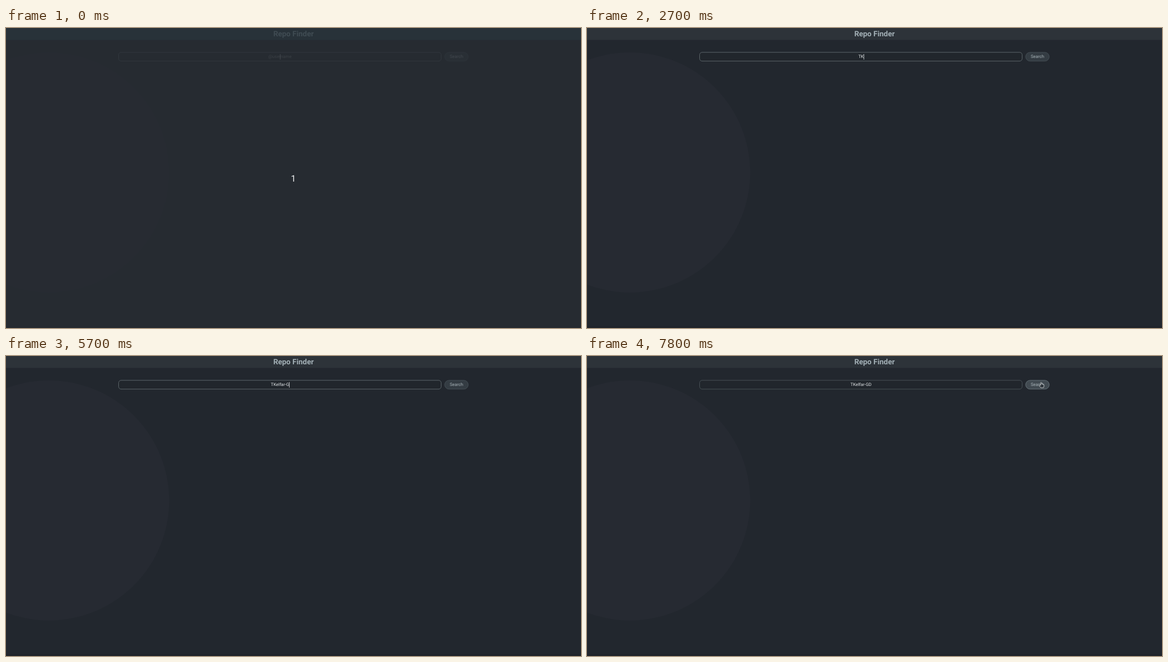
An HTML page for the animation above (8000 ms loop, 1034 by 541 pixels).

```html
<!DOCTYPE html>
<html lang="en">
<head>
<meta charset="utf-8">
<title>Repo Finder</title>
<style>
  html, body { margin: 0; width: 100%; height: 100%; overflow: hidden; background: #22272e; }
  svg { display: block; width: 1034px; height: 541px; }
  text { font: 7.85px Roboto, sans-serif; text-anchor: middle; text-rendering: geometricPrecision; }
  #title { font-size: 13.46px; font-weight: 700; fill: #a3b0b6; }
  #count { font-size: 16.2px; fill: #eceeef; }
  #label { fill: #a9b4b9; }
</style>
</head>
<body>
<svg viewBox="0 0 1034 541">
  <rect width="1034" height="541" fill="#22272e"/>
  <circle cx="77" cy="260.5" r="216.5" fill="#262a32"/>
  <rect y="537.5" width="1034" height="3.5" fill="#20242a"/>
  <rect width="1034" height="21.5" fill="#2d3339"/>
  <text id="title" x="517" y="15.3">Repo Finder</text>

  <rect id="box" x="202.5" y="43.9" width="580" height="15.8" rx="4.5" fill="#21262c"/>
  <text id="field" x="492.7" y="54.4"></text>
  <rect id="caret" y="47" width=".8" height="10" fill="#dfe3e5"/>

  <rect id="button" x="788.8" y="43.9" width="42.4" height="15.8" rx="7.9"/>
  <text id="label" x="810" y="54.4">Search</text>

  <path id="arrow" d="M0 0V9L2.1 7.2L3.6 10.2L5.2 9.4L3.8 6.5H6.6Z"
        fill="#22272e" stroke="#e6e8e9" stroke-width=".8" stroke-linejoin="round"/>
  <path id="hand" d="M-.9 5.6V1Q0 -.8 .9 1V3.6Q1.9 3 2.5 3.9Q3.4 3.4 4 4.3Q5 4 5.2 5V7.6L4.4 10H-.4L-3.1 6.9Q-3.2 5.3 -1.8 5.5Z"
        fill="#30373d" stroke="#e6e8e9" stroke-width=".75" stroke-linejoin="round"/>

  <g id="cover">
    <rect y="21.5" width="1034" height="519.5" fill="#272c33" opacity=".8"/>
    <rect width="1034" height="21.5" fill="#27323a" opacity=".8"/>
    <text id="count" x="516.8" y="276.5">1</text>
  </g>
</svg>
<script>
const LOOP = 8000;
const NAME = 'TKelfar-GD';
const HINT = '@username';

// time, letters typed, caret visible
const typing = [
  [0, 0, 1], [400, 0, 0], [1500, 1, 1], [1600, 1, 0],
  [2700, 2, 1], [2800, 2, 0], [3200, 3, 1], [3400, 4, 1],
  [3800, 5, 1], [4000, 6, 1], [4100, 7, 1], [4200, 7, 0],
  [4900, 8, 1], [5200, 8, 0], [5700, 9, 1], [6000, 10, 1], [6400, 10, 0]
];

// time, pointer tip x, y, over the button
const pointer = [
  [6900, 818.3, 66, 0], [7000, 818.3, 62, 0], [7100, 818, 53, 1], [7200, 817.5, 43, 1],
  [7400, 817.3, 44, 1], [7500, 817.1, 45, 1], [7600, 816.9, 46, 1],
  [7700, 816.7, 46.6, 1], [7800, 816.5, 47.2, 1]
];

const el = id => document.getElementById(id);
const [box, field, caret, button, arrow, hand, cover] =
  ['box', 'field', 'caret', 'button', 'arrow', 'hand', 'cover'].map(el);

const stepAt = (table, t) => table.filter(row => row[0] <= t).pop();
const show = (node, on) => node.setAttribute('visibility', on ? 'visible' : 'hidden');
const paint = (node, fill, stroke) => {
  node.setAttribute('fill', fill);
  node.setAttribute('stroke', stroke);
};

function drawField(t) {
  const [, count, blink] = stepAt(typing, t);
  const text = count ? NAME.slice(0, count) : HINT;
  if (field.textContent !== text) field.textContent = text;
  field.setAttribute('fill', count ? '#e4e8ea' : '#858b8d');
  const half = count ? field.getComputedTextLength() / 2 : 0;
  caret.setAttribute('x', 492.7 + half);
  show(caret, blink);

  // the border dims as focus leaves the field
  const fade = Math.min(5, Math.max(0, Math.floor((t - 7300) / 100))) / 5;
  const tone = [92, 101, 106].map(c => Math.round(c - 20 * fade));
  paint(box, '#21262c', `rgb(${tone})`);
}

function drawPointer(t) {
  const row = stepAt(pointer, t);
  const over = Boolean(row && row[3]);
  show(arrow, row && !over);
  show(hand, over);
  if (row) (over ? hand : arrow).setAttribute('transform', `translate(${row[1]} ${row[2]})`);
  paint(button, over ? '#424b52' : '#343c43', over ? '#657177' : '#444e55');
}

function frame(now) {
  const t = now % LOOP;
  drawField(t);
  drawPointer(t);
  show(cover, t < 100);
  requestAnimationFrame(() => frame(performance.now()));
}
frame(performance.now());
</script>
</body>
</html>
```
